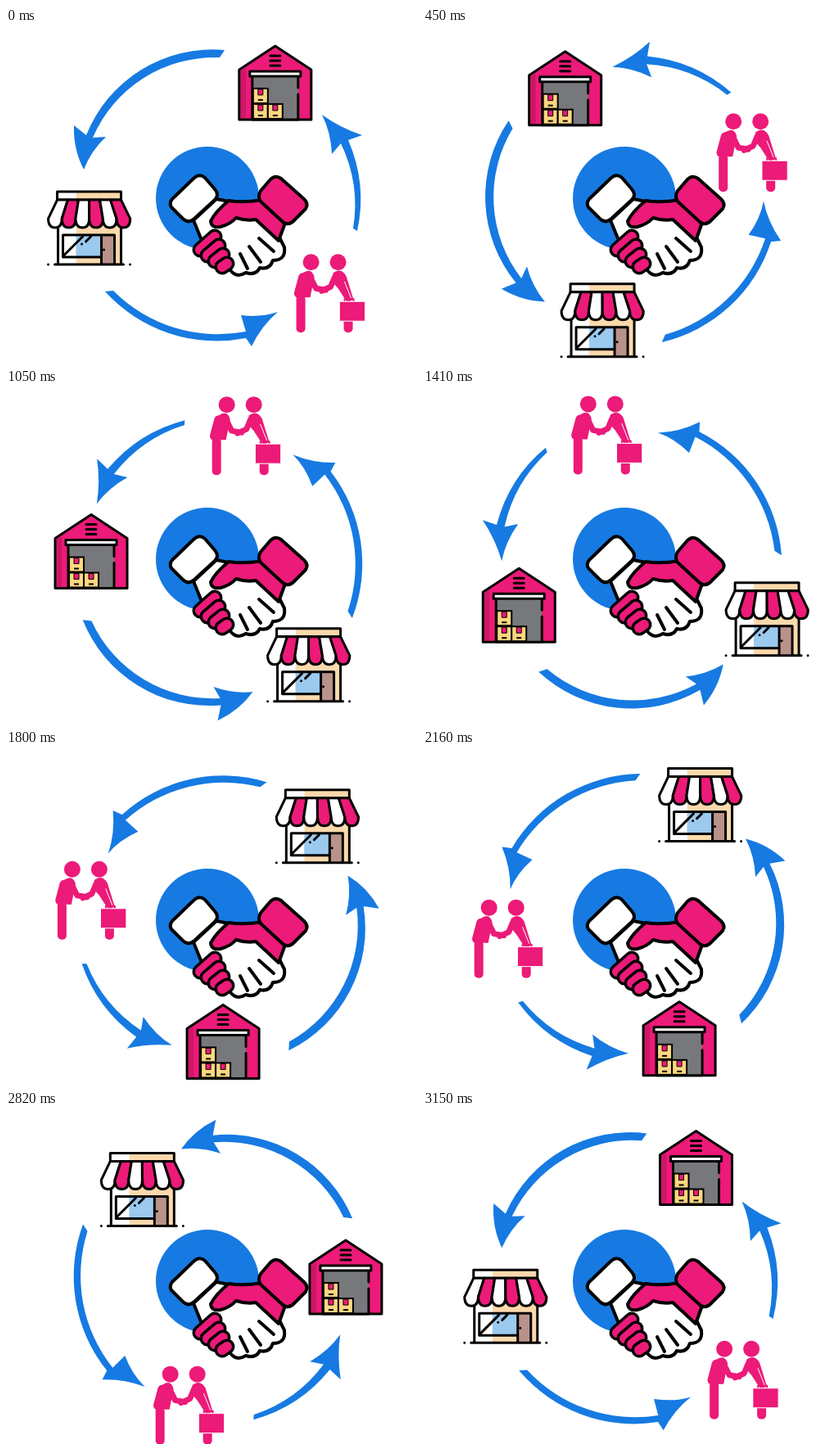
These frames come from a looping animation (502x407 px, 3.6 s). An HTML page:

```html
<!DOCTYPE html>
<html lang="en">
<head>
<meta charset="utf-8">
<title>Supply cycle</title>
<style>
  html, body { margin: 0; width: 100%; height: 100%; overflow: hidden; background: #fff; }
  svg { display: block; }
  .line { stroke: #000; stroke-width: 3; stroke-linejoin: round; stroke-linecap: round; }
  .bold { stroke: #000; stroke-width: 4; stroke-linejoin: round; stroke-linecap: round; }
  .pink { fill: #ec1a78; }
  .none { fill: none; }
</style>
</head>
<body>
<svg width="502" height="407" viewBox="0 0 502 407">
  <circle cx="246" cy="208" r="63" fill="#167ae2"/>

  <g id="arrows" fill="#167ae2">
    <path d="M267 27A166 166 0 0 0 98 131L83 119Q82 148 95 173Q104 150 122 133L106 134A162 162 0 0 1 261 36Z"/>
    <path d="M121 322A184 184 0 0 0 293 379L300 389Q312 364 332 347Q312 354 287 351L293 371A180 180 0 0 1 131 321Z"/>
    <path d="M429 248A182 182 0 0 0 418 137L435 131Q408 122 386 106Q397 128 398 154L409 141A175 175 0 0 1 424 245Z"/>
  </g>

  <g class="bold">
    <path fill="#fff" d="M229 235L240 262L272 293Q280 307 293 299Q305 303 310 293Q322 296 326 284Q342 284 340 268L325 238L272 212L257 209Z"/>
    <path class="pink" d="M313 210Q290 214 272 211Q256 224 250 236Q251 245 262 243Q274 240 281 232Q294 236 305 234L333 260L341 238Z"/>
    <path class="none" d="M309 257L327 273M297 267L311 286M286 276L295 294"/>
    <g id="fingers" class="none"></g>
    <path fill="#fff" d="M203 209L229 184Q236 177 243 183L255 197Q261 204 255 210L230 233Q222 240 215 232L202 219Q199 214 203 209Z"/>
    <path class="pink" d="M311 199L323 185Q329 179 336 184L364 209Q370 215 366 221L350 237Q343 242 337 236L311 212Q307 206 311 199Z"/>
  </g>

  <g id="warehouse">
    <path class="line pink" d="M-44 45V-16L0-45L44-16V45Z"/>
    <path fill="#cc1766" d="M-42 43V-14L-36-18V43Z"/>
    <path fill="#77787b" d="M-28-8H28V45H-28Z"/>
    <path class="line none" d="M-28-8V45H28V14M28-8V6M-6-33H6M-6-27H6M-6-21H6"/>
    <path class="line" fill="#fff" d="M-31-14H31V-8H-31Z"/>
    <g id="boxes"></g>
  </g>

  <g id="shop">
    <path fill="#fbd9ac" d="M-16-45H39V44H-16Z"/>
    <path fill="#fff" d="M-38-45H-16V44H-38ZM-16 8H-6L-16 22Z"/>
    <path fill="#9cc9ee" d="M-16 8H15V35H-16Z"/>
    <path fill="#b9928a" d="M15 8H31V44H15Z"/>
    <path class="line none" d="M-38-5V44M39-5V44M15 8H-32V35H15M15 44V8H31V44M-31 33L-8 10M-9 19v0M2 10L-4 16M18 26v0M-42 44H42M-50 44v0M50 44v0M-39-45H39V-35H-39Z"/>
    <g id="awning"></g>
  </g>

  <g id="people" class="pink" stroke="#ec1a78" stroke-linecap="round" stroke-linejoin="round">
    <g stroke="none">
      <circle cx="-23" cy="-38" r="10"/>
      <circle cx="10" cy="-38" r="10"/>
      <path d="M-33-25Q-22-32-19-20L-24 5H-41Q-45 2-43-3L-39-18Q-38-25-33-25Z"/>
      <rect x="-41" y="2" width="11" height="46" rx="5"/>
      <path d="M4-25Q14-32 20-21L29 8L21 11L10-6L3-14Z"/>
      <rect x="17" y="28" width="11" height="20" rx="5"/>
    </g>
    <path class="none" stroke-width="7" d="M-23-18L-17-6L-5-4M6-20L1-8L-10-3"/>
    <path class="none" stroke="#fff" d="M18-14L26 6"/>
    <path class="none" stroke-width="2" d="M18 11V7H29V11"/>
    <path stroke="#fff" d="M12 10H43V34H12Z"/>
  </g>
</svg>
<script>
const $ = id => document.getElementById(id);
const PINK = '#ec1a78';
const RAD = Math.PI / 180;
const repeat = (n, draw) => Array.from({ length: n }, (_, i) => draw(i)).join('');

// three pink fingers, each a little shorter, and a thumb tip
const stroke = (d, color, width) => `<path d="${d}" stroke="${color}" stroke-width="${width}"/>`;
$('fingers').innerHTML = repeat(4, i => {
  const d = `M${255 + 5 * i} ${255 + 11 * i}l${4 * i - 18} ${16 - 4 * i}`;
  return stroke(d, '#000', 19) + stroke(d, PINK, 12);
});

$('boxes').innerHTML = repeat(3, i =>
  `<g transform="translate(${i < 2 ? -27 : -9} ${i ? 26 : 7})">
   <rect width="18" height="18" fill="#fbd77f" stroke="#000" stroke-width="2"/>
   <path d="M6 1h6v7h-6z" fill="${PINK}" stroke="#000"/><path d="M6 14h6" stroke="#000" stroke-width="2"/></g>`);

$('awning').innerHTML = repeat(6, i => {
  const top = 13 * i - 39, low = 16.7 * i - 50;
  return `<path class="line" fill="${i % 2 ? PINK : '#fff'}"
    d="M${top}-35h13L${low + 16.7}-12q0 11-8.3 11T${low}-12Z"/>`;
});

// key poses: time in ms, turn in degrees
const keys = [[0, 0], [450, 61], [690, 95], [1410, 142], [1800, 211], [2490, 247], [3150, 358]];

function speed(i) {
  const [t0, a] = keys[Math.max(i - 1, 0)], [t1, b] = keys[Math.min(i + 1, keys.length - 1)];
  return (b - a) / (t1 - t0);
}

function turnAt(t) {
  const i = Math.max(keys.findIndex(k => t <= k[0]), 1);
  const [t0, a] = keys[i - 1], [t1, b] = keys[i];
  const d = t1 - t0, s = (t - t0) / d, r = 1 - s;
  return a * r * r * (1 + 2 * s) + b * s * s * (3 - 2 * s) + d * s * r * (speed(i - 1) * r - speed(i) * s);
}

const icons = [
  { el: $('warehouse'), cx: 257, cy: 202, r: 153, start: 62, oval: 0 },
  { el: $('shop'), cx: 262, cy: 208, r: 156, start: 193, oval: 10 },
  { el: $('people'), cx: 257, cy: 208, r: 155, start: -40, oval: 0 }
];

function draw(now) {
  const turn = turnAt(Math.min(Math.floor(now % 3600 / 30) * 30, 3150));
  $('arrows').setAttribute('transform', `rotate(${-turn} 259 208)`);
  for (const { el, cx, cy, r, start, oval } of icons) {
    const a = (start + turn) * RAD;
    // every orbit swells at the lower right
    const swell = 26 * Math.exp(8 * (Math.cos(a + 38 * RAD) - 1));
    const dist = r + swell + oval * Math.cos(2 * (turn - 15) * RAD);
    el.setAttribute('transform', `translate(${cx + dist * Math.cos(a)} ${cy - dist * Math.sin(a)})`);
  }
}

const origin = performance.now();
function tick() {
  draw(performance.now() - origin);
  requestAnimationFrame(tick);
}
tick();
</script>
</body>
</html>
```
